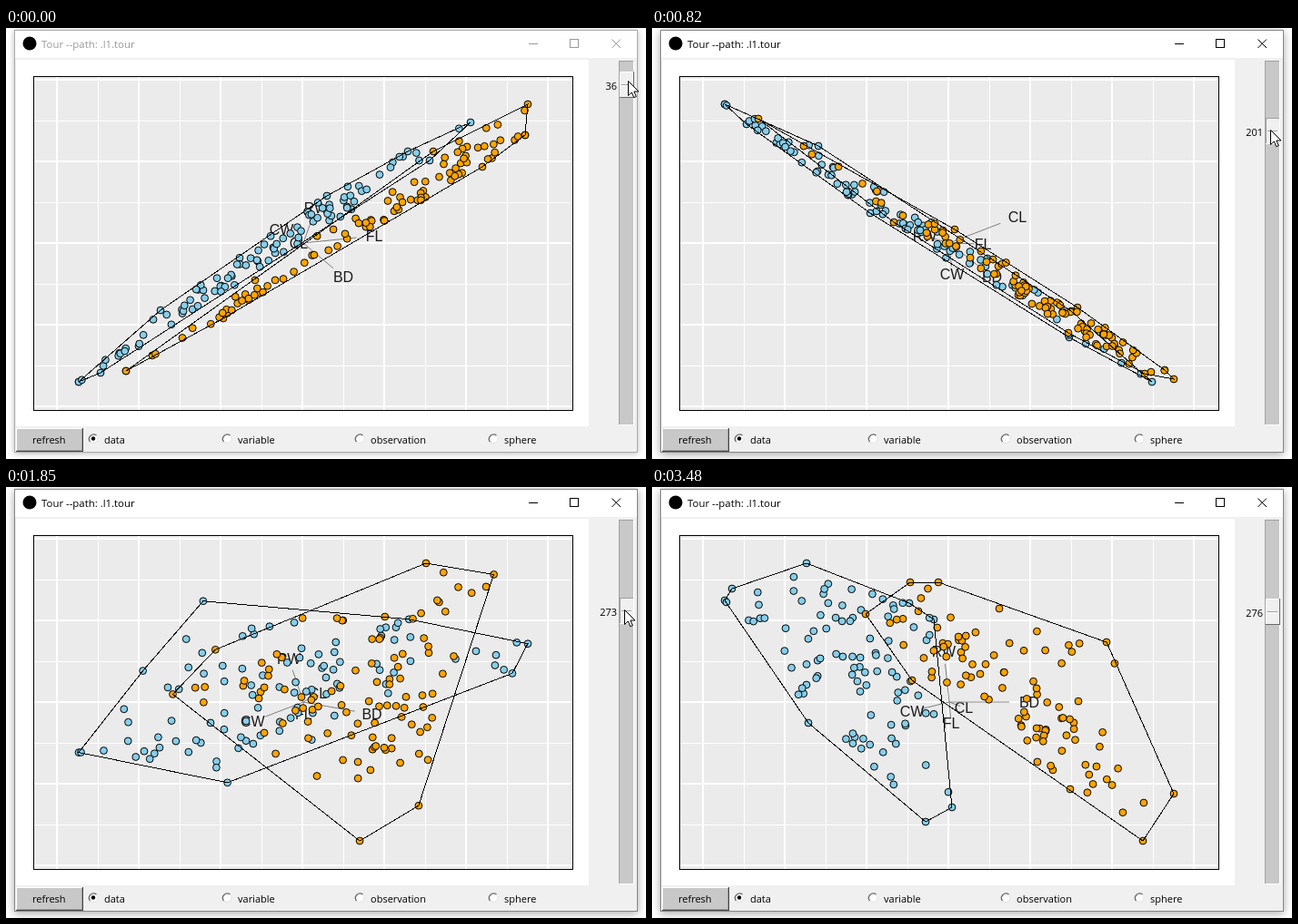
An HTML page for the animation above (3.76 s loop, 704 by 475 pixels).

```html
<!DOCTYPE html>
<html lang="en">
<head>
<meta charset="utf-8">
<title>Tour</title>
<style>
  html, body { margin: 0; width: 100%; height: 100%; overflow: hidden; background: #fff; }
  svg { display: block; width: 704px; height: 475px; }
  text { font: 11px "Open Sans", "Noto Sans", sans-serif; fill: #000; }
  #axes text { font: 16px "Liberation Sans", Arial, sans-serif; fill: #1a1a1a; text-anchor: middle; }
  #axes path { stroke: #808080; }
  #dots circle { stroke: #000; }
  #hulls path { stroke: #000; fill: none; shape-rendering: crispEdges; }
  .frame { stroke: #858585; filter: drop-shadow(0 2px 5px rgba(0, 0, 0, .35)); }
  .idle .frame { stroke: #aaa; filter: drop-shadow(0 1px 3px rgba(0, 0, 0, .28)); }
  #title { font-size: 11.4px; }
  .idle #title { fill: #999; }
  .ctl { stroke: #000; fill: none; }
  .idle .ctl { stroke: #999; }
  .crisp { shape-rendering: crispEdges; }
</style>
</head>
<body>
<svg id="stage" viewBox="0 0 704 475" xmlns="http://www.w3.org/2000/svg">
  <rect width="704" height="475" fill="#fff"/>
  <rect class="frame" x="9.5" y="2.5" width="685" height="465" fill="#f0f0f0"/>
  <rect x="10" y="3" width="684" height="30" fill="#fff"/>
  <circle cx="26" cy="17" r="7.5"/>
  <text id="title" x="39" y="22">Tour --path: .l1.tour</text>
  <path class="ctl crisp" d="M575 17.5h10M620.5 12.5h9v9h-9z"/>
  <path class="ctl" d="M666.5 12.5l9.5 9.5m0-9.5l-9.5 9.5"/>
  <rect x="11" y="35" width="630" height="404" fill="#fff"/>
  <rect x="30" y="53" width="594" height="369" fill="#ebebeb"/>
  <g id="grid" class="crisp" stroke="#fff"></g>
  <rect class="crisp" x="30.5" y="53.5" width="593" height="368" fill="none" stroke="#000"/>
  <g id="axes"></g>
  <g id="dots"></g>
  <g id="hulls"></g>
  <g id="widgets" class="crisp"></g>
  <text x="29" y="458">refresh</text>
  <g id="radios"></g>
  <g id="thumb" class="crisp"></g>
  <text id="value" x="672" text-anchor="end"></text>
  <path id="cursor" d="M.5 .5v16l3.800-3.500l2.500 5.700l2.500-1.100l-2.400-5.600h5.100z" fill="#fff" stroke="#000"/>
</svg>
<script>
const $ = id => document.getElementById(id);
const mix = (a, b, f) => a + (b - a) * f;
const mixPt = (p, q, f) => [mix(p[0], q[0], f), mix(p[1], q[1], f)];
const parse = s => s.split(' ').map(p => p.split(',').map(Number));

// Piecewise linear value of [x, y] keys
function along(keys, x) {
  const i = keys.findIndex(k => k[0] > x);
  if (i < 1) return (i ? keys[keys.length - 1] : keys[0])[1];
  const [a, b] = [keys[i - 1], keys[i]];
  return mix(a[1], b[1], (x - a[0]) / (b[0] - a[0]));
}
const indexed = list => list.map((v, i) => [i, v]);

const LOOP = 3760, CORNERS = 8, GROUP = 100;
const ORIGIN = [327, 237];
const FILLS = ['#87ceeb', '#ffa500'];

// Outline corners of each projection, clockwise from the left: blue | orange
const poses = [
  '80,390 170,311 353,185 442,136 511,104 466,146 104,380|132,378 470,136 574,84 571,118 524,153 239,320',
  '80,84 188,99 225,116 438,231 539,390 483,361 102,109|113,96 419,172 574,275 558,382 534,369 290,219',
  '80,84 183,130 461,312 550,390 459,341 240,204 104,106|117,100 333,222 468,308 564,377 574,387 542,381 458,336 266,214',
  '80,390 197,204 224,176 423,99 571,84 552,115 194,344 159,362|116,259 217,174 498,108 574,102 434,210 336,276 231,342 169,378',
  '80,390 131,291 205,166 397,98 554,84 538,114 202,350 165,364|153,237 215,164 510,101 574,108 464,212 314,322 279,347 216,386',
  '80,142 151,84 174,102 354,265 381,355 370,386 238,291 111,203|187,238 207,107 265,126 351,176 404,214 574,359 536,390',
  '80,125 88,112 170,84 283,128 310,146 330,353 301,369 172,260|235,140 284,105 315,105 500,171 574,338 540,390 460,333 286,213'
].map(s => s.split('|').map(parse).map(spread));

// Label paths through poses 0, 1, 2, 3 and the last; steady drift after 3
const labels = {
  RW: '341,198 376,198 300,229 303,197 321,181',
  CL: '322,237 364,229 402,208 343,214 343,243',
  FL: '405,229 362,222 364,238 326,243 329,260',
  CW: '303,222 345,261 330,271 259,268 286,247',
  BD: '371,274 392,273 374,274 392,262 415,237'
};
const labelPos = [[0, 0], [3, 3], [6, 4]];

const values = indexed([36, 88, 201, 250, 263, 289, 276]);
const tips = indexed([58, 87, 112, 124, 134, 136, 135]);

// The tour is dragged along these keys and redrawn only at the change times.
const drag = [[280, 0], [430, .3], [580, 1], [820, 2], [1180, 3], [1330, 3], [1700, 4], [2100, 5], [2500, 5], [2660, 6]];
const changes = [0, 280, 430, 580, 700, 820, 940, 1060, 1180, 1580, 1700, 1850, 1975, 2100, 2500, 2660, 3220, 3360, 3480];

function seeded(seed) {
  return () => {
    seed = (seed + 0x6D2B79F5) | 0;
    let t = Math.imul(seed ^ (seed >>> 15), 1 | seed);
    t = (t + Math.imul(t ^ (t >>> 7), 61 | t)) ^ t;
    return ((t ^ (t >>> 14)) >>> 0) / 4294967296;
  };
}

function spread(corners) {
  return Array.from({ length: CORNERS }, (_, i) => corners[Math.floor(i * corners.length / CORNERS)]);
}

// A specimen is a fixed blend of its group's corners, so it stays inside the outline.
const rand = seeded(36);
function specimen() {
  const w = Array.from({ length: CORNERS }, () => rand() ** 5);
  const sum = w.reduce((a, b) => a + b);
  return w.map(x => x / sum);
}
const specimens = FILLS.map(() => Array.from({ length: GROUP - CORNERS }, specimen));
const blend = (weights, corners) =>
  [0, 1].map(k => weights.reduce((s, w, i) => s + w * corners[i][k], 0));

const cross = (o, a, b) => (a[0] - o[0]) * (b[1] - o[1]) - (a[1] - o[1]) * (b[0] - o[0]);

function convexHull(pts) {
  const sorted = [...pts].sort((a, b) => a[0] - b[0] || a[1] - b[1]);
  const chain = list => {
    const out = [];
    for (const p of list) {
      while (out.length > 1 && cross(out[out.length - 2], out[out.length - 1], p) <= 0) out.pop();
      out.push(p);
    }
    return out.slice(0, -1);
  };
  return [...chain(sorted), ...chain(sorted.reverse())];
}

// Every projection is rescaled to fill the panel.
function fit(groups) {
  const scale = (k, lo, hi) => {
    const v = groups.flat().map(p => p[k]), min = Math.min(...v), max = Math.max(...v);
    return x => mix(lo, hi, (x - min) / (max - min));
  };
  const sx = scale(0, 80, 574), sy = scale(1, 84, 390);
  return groups.map(g => g.map(p => [sx(p[0]), sy(p[1])]));
}

function between(list, pos) {
  const i = Math.min(Math.floor(pos), list.length - 2);
  return [list[i], list[i + 1], pos - i];
}

function drawPlot(pos) {
  const [a, b, f] = between(poses, pos);
  const groups = fit(a.map((g, k) => g.map((p, n) => mixPt(p, b[k][n], f))));
  $('axes').innerHTML = Object.entries(labels).map(([name, path]) => {
    const p = mixPt(...between(parse(path), along(labelPos, pos)));
    return `<path d="M${ORIGIN}L${mixPt(ORIGIN, p, .75)}"/><text x="${p[0]}" y="${p[1] + 5.5}">${name}</text>`;
  }).join('');
  $('dots').innerHTML = groups.map((corners, k) => `<g fill="${FILLS[k]}">` +
    [...corners, ...specimens[k].map(w => blend(w, corners))]
      .map(([x, y]) => `<circle cx="${x.toFixed(1)}" cy="${y.toFixed(1)}" r="3.9"/>`).join('') + '</g>').join('');
  $('hulls').innerHTML = groups.map(g => `<path d="M${convexHull(g).join('L')}Z"/>`).join('');
}

// Box with a light upper left and a dark lower right edge, or any other pair
const bevel = (x, y, w, h, fill, lit, dark) =>
  `<rect x="${x}" y="${y}" width="${w}" height="${h}" fill="${fill}"/>
   <path d="M${x + .5} ${y + h}V${y + .5}H${x + w}" fill="none" stroke="${lit}"/>
   <path d="M${x + w - .5} ${y}V${y + h - .5}H${x}" fill="none" stroke="${dark}"/>`;

function drawSlider(value, pressed) {
  const y = Math.round(36.5 + value * .3122), m = y + 15;
  const edges = pressed ? ['#a0a0a0', '#fff'] : ['#fff', '#696969'];
  $('thumb').innerHTML = bevel(675, y, 16, 29, '#f0f0f0', ...edges) +
    `<path d="M677 ${m - .5}h11" stroke="#a0a0a0"/><path d="M677 ${m + .5}h11" stroke="#fff"/>`;
  $('value').textContent = Math.round(value);
  $('value').setAttribute('y', m + 5);
}

function drawStep(t) {
  const pos = along(drag, t), slide = t >= 2500 ? 6 : pos;
  $('stage').classList.toggle('idle', t < 280);
  drawPlot(pos);
  drawSlider(along(values, slide), t >= 280 && t < 3220);
  const tip = t < 3360 ? [684 - 4 * Math.min(1, slide), along(tips, slide)] : [668, 399];
  $('cursor').setAttribute('transform', `translate(${tip.map(Math.round)})`);
  $('cursor').style.display = t < 3480 ? '' : 'none';
}

function drawStatic() {
  let grid = '';
  for (let i = 0; i < 13; i++) {
    const x = 56 + 45 * i, y = 57 + 45 * i, w = i % 2 ? 1 : 2, o = i % 2 ? .5 : 0;
    grid += `<path stroke-width="${w}" d="M${x + o} 54V421${y < 421 ? `M31 ${y + o}H623` : ''}"/>`;
  }
  $('grid').innerHTML = grid;
  $('widgets').innerHTML = bevel(674, 36, 17, 402, '#c8c8c8', '#a0a0a0', '#fff') +
    bevel(11, 441, 74, 26, '#c8c8c8', '#fff', '#444') +
    '<path d="M83.5 442v23.5H12" fill="none" stroke="#a0a0a0"/>';
  $('radios').innerHTML = ['data', 'variable', 'observation', 'sphere'].map((name, i) => {
    const x = Math.round(96 + 146.6 * i);
    return `<g transform="translate(${x} 452.500)"><circle r="5" fill="#fff" stroke="#e3e3e3"/>
      <path d="M-3.500 3.500A5 5 0 0 1 3.500-3.500" fill="none" stroke="#696969" stroke-width="1.300"/>
      ${i ? '' : '<circle r="2.2"/>'}<text x="12" y="5.5">${name}</text></g>`;
  }).join('');
}

let shown = -1;
const begin = performance.now();
function tick() {
  const t = Math.max(0, performance.now() - begin) % LOOP;
  const step = changes.filter(c => c <= t).pop();
  if (step !== shown) drawStep(shown = step);
  requestAnimationFrame(tick);
}
drawStatic();
tick();
</script>
</body>
</html>
```
